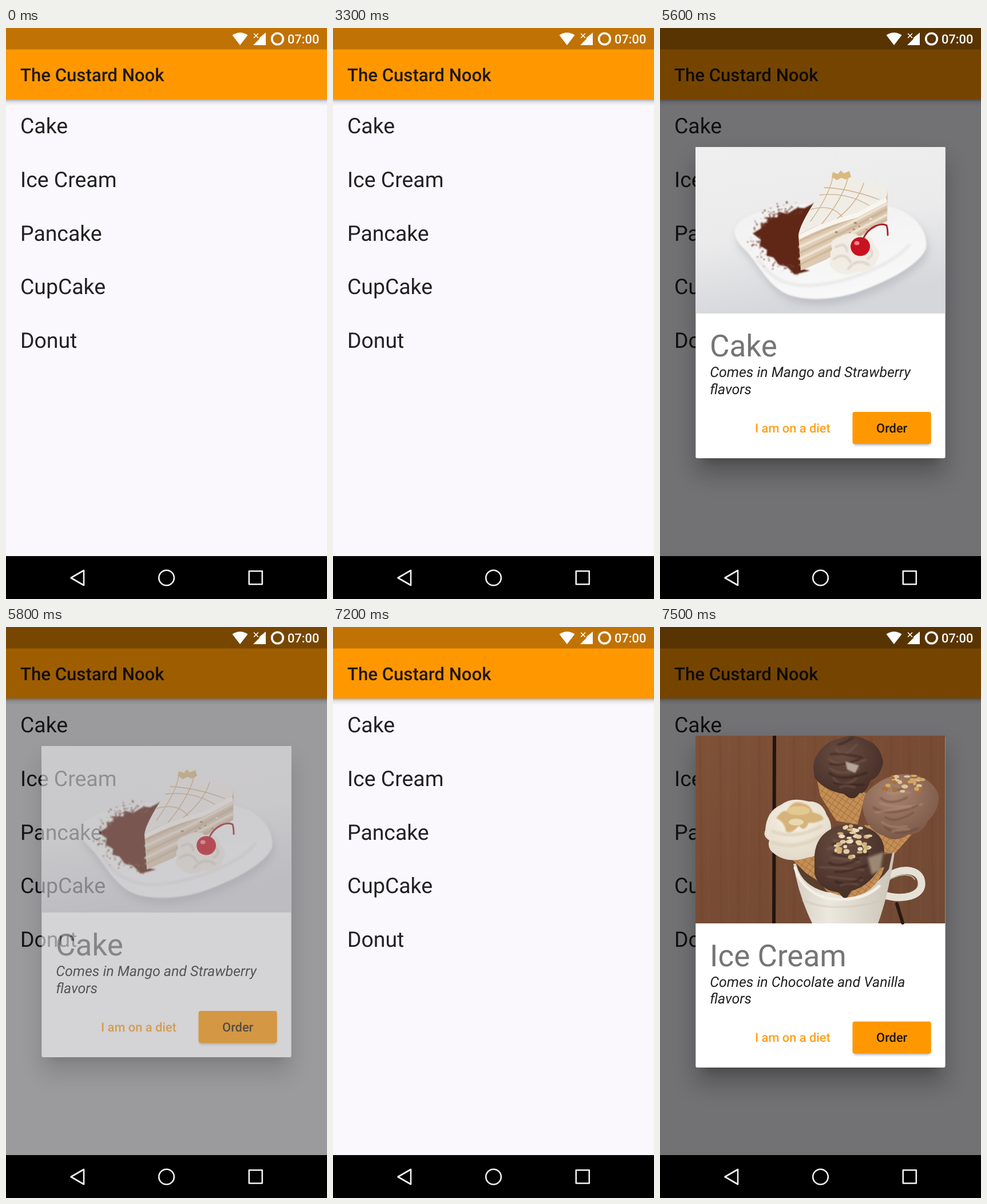
Animation, 561 px wide and 998 px high, one loop 8 s. Source, as an HTML page:

```html
<!DOCTYPE html>
<html lang="en">
<head>
<meta charset="utf-8">
<title>Dessert list</title>
<style>
html, body { margin: 0; width: 100%; height: 100%; overflow: hidden; background: #000; }
svg { display: block; width: 100vw; height: 100vh; }
text { font-family: Roboto, "Open Sans", sans-serif; text-rendering: geometricPrecision; }
.item { font-size: 37.4px; fill: #212023; }
.bar { font-size: 31.17px; font-weight: 500; fill: #201712; }
.clock { font-size: 21.8px; font-weight: 500; fill: #fff; }
.head { font-size: 53px; fill: #757575; }
.note { font-size: 24.93px; font-style: italic; fill: #212121; }
.btn { font-size: 21.8px; font-weight: 500; }
.line { fill: none; stroke-linecap: round; stroke-linejoin: round; }
</style>
</head>
<body>
<svg viewBox="0 0 561 998" preserveAspectRatio="none">
  <defs>
    <linearGradient id="drop" x2="0" y2="1">
      <stop stop-color="#000" stop-opacity=".3"/>
      <stop offset=".4" stop-color="#000" stop-opacity=".09"/>
      <stop offset="1" stop-color="#000" stop-opacity="0"/>
    </linearGradient>
    <linearGradient id="table" x2=".25" y2="1">
      <stop stop-color="#f0eff0"/><stop offset=".55" stop-color="#ebebec"/><stop offset="1" stop-color="#d6d7db"/>
    </linearGradient>
    <linearGradient id="plate" x2=".3" y2="1">
      <stop stop-color="#f1f1f1"/><stop offset="1" stop-color="#f8f8f8"/>
    </linearGradient>
    <linearGradient id="side" x2="1" y2=".4">
      <stop stop-color="#e4d0b7"/><stop offset="1" stop-color="#d6c2aa"/>
    </linearGradient>
    <linearGradient id="wood" x2="1" y2="1">
      <stop stop-color="#7e5238"/><stop offset=".45" stop-color="#784c34"/><stop offset="1" stop-color="#714a35"/>
    </linearGradient>
    <linearGradient id="cup">
      <stop stop-color="#d6cfc2"/><stop offset=".35" stop-color="#ece8de"/><stop offset="1" stop-color="#cbc3b6"/>
    </linearGradient>
    <pattern id="waffle" width="9" height="9" patternUnits="userSpaceOnUse" patternTransform="rotate(35)">
      <rect width="9" height="9" fill="#c48f55"/><path d="M0 0H9M0 0V9" stroke="#a56f3b" stroke-width="2"/>
    </pattern>
    <radialGradient id="dark" cx=".4" cy=".3" r=".75"><stop stop-color="#6a4d42"/><stop offset="1" stop-color="#412b24"/></radialGradient>
    <radialGradient id="milk" cx=".4" cy=".3" r=".75"><stop stop-color="#a98470"/><stop offset="1" stop-color="#785645"/></radialGradient>
    <radialGradient id="cream" cx=".45" cy=".35" r=".75"><stop stop-color="#f8f3e8"/><stop offset="1" stop-color="#dfd5c2"/></radialGradient>
    <filter id="soft" x="-30%" y="-30%" width="160%" height="160%"><feGaussianBlur stdDeviation="20"/></filter>
    <filter id="near" x="-30%" y="-30%" width="160%" height="160%"><feGaussianBlur stdDeviation="2"/></filter>
    <filter id="blend" x="-10%" y="-10%" width="120%" height="120%"><feGaussianBlur stdDeviation=".8"/></filter>
    <filter id="haze" x="-30%" y="-30%" width="160%" height="160%"><feGaussianBlur stdDeviation="7"/></filter>
  </defs>

  <rect width="561" height="998" fill="#faf8fc"/>
  <g id="list"></g>
  <rect y="125" width="561" height="11" fill="url(#drop)"/>
  <rect y="37" width="561" height="88" fill="#ff9800"/>
  <rect width="561" height="37.5" fill="#c07204"/>
  <text class="bar" x="25" y="93">The Custard Nook</text>

  <rect id="scrim" width="561" height="923" fill="#000" opacity="0"/>
  <g id="cake" opacity="0"></g>
  <g id="ice" opacity="0"></g>

  <g fill="#fff">
    <path d="M395.5 12.5Q409 3.5 422.5 12.5L409 30Z"/>
    <path d="M454 8V30H432L443 19V17Z"/>
    <path class="line" d="M433.5 10L440.5 17M440.5 10L433.5 17" stroke="#fff" stroke-width="1.6"/>
    <circle cx="474.5" cy="19" r="9.8" fill="none" stroke="#fff" stroke-width="3.6"/>
    <text class="clock" x="492" y="27.3">07:00</text>
  </g>
  <rect y="923" width="561" height="75"/>
  <g class="line" stroke="#f4f4f4" stroke-width="2.6">
    <path d="M113.5 961L136 948V974Z"/>
    <circle cx="280.5" cy="961" r="13.3"/>
    <rect x="424.8" y="949.3" width="23" height="23"/>
  </g>
</svg>
<script>
const $ = id => document.getElementById(id);

let seed = 7;
const rnd = () => (seed = seed * 16807 % 2147483647) / 2147483647;
const times = (n, make) => Array.from({ length: n }, (_, i) => make(i)).join('');
const shape = (d, fill, more = '') => `<path d="${d}" fill="${fill}" ${more}/>`;
const line = (d, color, width, more = '') =>
  `<path class="line" d="${d}" stroke="${color}" stroke-width="${width}" ${more}/>`;
const oval = (x, y, rx, ry, fill, more = '') =>
  `<ellipse cx="${x}" cy="${y}" rx="${rx}" ry="${ry}" fill="${fill}" ${more}/>`;
const blend = parts => `<g filter="url(#blend)">${parts}</g>`;

// Small random pieces inside an oval
const crumbs = (n, x, y, rx, ry, size, colors) => times(n, i => {
  const a = rnd() * Math.PI * 2, r = Math.sqrt(rnd());
  const px = x + Math.cos(a) * r * rx, py = y + Math.sin(a) * r * ry;
  return oval(px.toFixed(1), py.toFixed(1), (size * (.6 + rnd() * .6)).toFixed(1),
    (size * (.4 + rnd() * .4)).toFixed(1), colors[i % colors.length]);
});

// Loose powder scattered around the rim of an oval
const powder = (n, x, y, rx, ry) => times(n, () => {
  const a = Math.PI * (.42 + rnd() * 1.2), r = .78 + rnd() * rnd() * .4;
  const s = (.4 + rnd() * 1.2).toFixed(1);
  return oval((x + Math.cos(a) * r * rx).toFixed(1), (y + Math.sin(a) * r * ry).toFixed(1), s, s, '#7a4434');
});

// Soft folds across a scoop, light and dark by turns
const folds = (n, x, y, w, h, colors) => blend(times(n, i => {
  const k = (i + .5) / n * 2 - 1, half = w * Math.sqrt(1 - k * k) * (.5 + rnd() * .35);
  const left = x - half + (rnd() - .5) * w * .3;
  return line(`M${left} ${y + k * h}q${half * .6} ${rnd() * 26 - 6} ${half * 1.7} ${rnd() * 20 - 12}`,
    colors[i % colors.length], 3.5, 'opacity=".5"');
}));

function cakePhoto() {
  const plate = 'M131 352C138 324 200 310 270 306L395 311C440 318 470 352 465 385C455 412 405 440 350 460' +
    'C300 478 240 478 212 460C185 442 170 412 152 391C138 378 128 366 131 352Z';
  return `<rect x="62" y="208" width="436.5" height="291" fill="url(#table)"/>` +
    shape(plate, '#a7a8b0', 'transform="translate(3 10)" filter="url(#haze)" opacity=".5"') +
    shape(plate, 'url(#plate)', 'filter="url(#blend)"') +
    line('M172 405C195 438 218 451 262 450C330 446 405 414 436 379', '#e4e4e6', 4, 'filter="url(#near)"') +
    blend(shape('M162 359L177 350L176 342L188 340L188 331L205 331L208 321L222 325L240 314L252 315L273 304' +
      'L290 330L262 392L247 421L262 424L235 431L222 417L208 414L198 401L186 398L187 388L174 380L176 370Z', '#602817') +
      powder(170, 226, 369, 66, 58)) +
    shape('M398 285L397 336L355 362L292 404L246 424L242 362Z', 'url(#side)') +
    blend(times(5, i => line(`M244 ${372 + i * 10.5}L${320 - i} ${338 + i * 10}L396 ${298 + i * 9.5}`,
      i % 2 ? '#f2e8da' : '#c2a98b', i % 2 ? 4 : 2))) +
    crumbs(14, 338, 343, 48, 18, 2.5, ['#a58a6e', '#eee0cb', '#b8997b']) +
    shape('M242 362C246 335 278 295 297 259Q305 253 320 259L394 277Q402 288 392 299L345 322Q278 341 242 362Z', '#f0ece6') +
    shape('M242 362Q278 341 345 322L395 296L397 304L345 331Q278 350 243 370Z', '#f8f5ef') +
    line('M287 279Q330 280 383 300M279 292Q325 286 365 310M264 317Q300 307 318 330' +
      'M302 259Q298 289 263 338M328 264Q318 300 283 342M356 271Q347 303 310 333', '#cdb088', 1.3) +
    shape('M300 260L302 252L311 255L316 249L321 254L331 250L334 260L325 265L317 262L309 266Z', '#d9b980') +
    shape('M301 386Q294 370 314 365Q331 354 349 364Q373 359 374 381Q389 390 379 407Q374 427 346 426' +
      'Q322 437 305 423Q292 414 299 402Q295 394 301 386Z', '#f1ece4') +
    line('M307 383Q325 373 327 390M304 404Q322 390 333 409M329 421Q344 401 365 414M364 384Q378 394 363 403',
      '#ddd5ca', 4, 'filter="url(#blend)"') +
    oval(350, 382, 17, 16.5, '#c9121f') + oval(344, 376, 4.5, 3.5, '#f5858a') +
    line('M354 371C364 345 388 340 396 345Q398 351 398 362', '#a8202a', 2.8);
}

function icePhoto() {
  const nuts = ['#e3cda0', '#cfb07a', '#eadcbd'];
  const fudge = ['#2b1814', '#7a5d50'];
  return `<rect x="62" y="190" width="436.5" height="328" fill="url(#wood)"/>` +
    blend(times(26, i => {
      const x = 66 + i * 16.8 + rnd() * 7;
      return line(`M${x} 193q${rnd() * 8 - 4} 160 ${rnd() * 6 - 2} 322`, i % 2 ? '#8b5d42' : '#61392a', 2, 'opacity=".3"');
    })) +
    shape('M197 190H203L202 518H196Z', '#24140f') +
    line('M414 484L424 517', '#2b1912', 6) +
    shape('M272 254L280 295L308 339L345 345L360 290Z', 'url(#waffle)') +
    shape('M268 244C270 222 288 200 311 196Q336 184 360 197Q386 206 390 237Q385 262 368 268Q358 294 349 290' +
      'Q338 308 322 292Q288 287 270 263Z', 'url(#dark)') +
    folds(10, 329, 243, 54, 42, fudge) +
    shape('M324 235L348 242L341 255L327 249Z', '#b5a69a', 'filter="url(#blend)"') +
    shape('M357 346L390 394L411 395L450 352Z', 'url(#waffle)') +
    shape('M355 322Q350 292 377 275Q405 254 442 258Q474 263 487 293Q489 319 468 339Q459 362 434 363' +
      'Q410 378 391 365Q363 356 355 322Z', 'url(#milk)') +
    folds(10, 421, 320, 58, 42, ['#644538', '#b3917d']) +
    crumbs(28, 427, 275, 40, 17, 5, ['#d2a765', '#dfc698', '#a9713d']) +
    line('M397 437C425 418 455 424 457 446C460 470 425 479 390 468', '#e6e1d7', 13) +
    line('M399 443C422 428 441 433 445 441', '#b9b1a4', 2) +
    shape('M233 414Q242 469 266 518H381Q399 470 410 394Z', 'url(#cup)') +
    shape('M238 414Q247 452 290 463Q365 473 400 423L406 395Z', '#5b3d2c') +
    shape('M226 401L255 430L284 449L301 382Z', 'url(#waffle)') +
    shape('M184 355Q186 322 211 311Q230 296 260 305Q283 304 291 328Q306 350 293 368Q290 399 258 403' +
      'Q225 414 202 398Q186 388 191 373Q179 366 184 355Z', 'url(#cream)') +
    line('M196 376Q237 392 286 363M197 357Q234 373 282 348', '#d9ccb4', 4, 'filter="url(#near)"') +
    shape('M203 334Q214 318 222 322Q231 301 250 308Q264 312 267 324Q284 327 286 336Q272 344 260 342' +
      'Q252 361 243 347Q229 364 220 357Q218 341 203 334Z', '#d6b37a', 'filter="url(#blend)"') +
    oval(242, 321, 20, 8, '#e3c890') + oval(238, 341, 13, 6, '#e9d8b2') +
    shape('M272 438L292 462L326 473Q377 469 392 420Z', 'url(#waffle)') +
    shape('M270 410Q268 373 294 356Q320 338 354 349Q384 355 391 382Q395 408 380 427Q362 454 335 461' +
      'L324 477L312 464Q279 460 270 432Z', 'url(#dark)') +
    folds(12, 330, 408, 56, 48, fudge) +
    shape('M363 403L391 393L385 425L370 433Z', '#9c8873', 'filter="url(#near)"') +
    crumbs(44, 335, 375, 33, 29, 5, nuts) +
    line('M236 421Q248 461 292 474Q350 483 383 453', '#f3efe6', 5) +
    line('M250 478Q305 501 384 479', '#cfc8bb', 2, 'filter="url(#blend)"');
}

function dialog(photo, top, split, name, notes) {
  const height = 960 - top * 2, dy = split - 499;
  const shadow = (x, y, w, h, alpha, filter) =>
    `<rect x="${x}" y="${y}" width="${w}" height="${h}" opacity="${alpha}" filter="url(#${filter})"/>`;
  return shadow(62, top + 22, 436.5, height + 6, .26, 'soft') +
    shadow(76, top + 24, 408, height - 18, .14, 'haze') +
    `<rect x="62.3" y="${top}" width="436.3" height="${height}" rx="3" fill="#fff"/>` + photo +
    `<g transform="translate(0 ${dy})">
      <text class="head" x="87" y="574">${name}</text>` +
      notes.map((s, i) => `<text class="note" x="87.3" y="${610 + i * 29.5}">${s}</text>`).join('') +
      `<text class="btn" x="166" y="706.5" fill="#ff9f1a">I am on a diet</text>` +
      shadow(339, 676, 132, 53, .32, 'near') +
      `<rect x="336.5" y="671" width="137.3" height="56" rx="4" fill="#ff9800"/>
      <text class="btn" x="405.2" y="706.5" text-anchor="middle" fill="#201300">Order</text>
    </g>`;
}

$('list').innerHTML = ['Cake', 'Ice Cream', 'Pancake', 'CupCake', 'Donut']
  .map((s, i) => `<text class="item" x="25" y="${184.3 + i * 93.6}">${s}</text>`).join('');
$('cake').innerHTML = dialog(cakePhoto(), 208, 499, 'Cake', ['Comes in Mango and Strawberry', 'flavors']);
$('ice').innerHTML = dialog(icePhoto(), 190, 517.5, 'Ice Cream', ['Comes in Chocolate and Vanilla', 'flavors']);

// [time in ms, opacity], each value held until the next
const LOOP = 8000;
const steps = {
  scrim: [[0, 0], [3400, .475], [3500, .54], [5800, .38], [5900, 0], [7300, .475], [7400, .54]],
  cake: [[0, 0], [3400, .78], [3500, 1], [5800, .57], [5900, 0]],
  ice: [[0, 0], [7300, .78], [7400, 1]]
};
for (const [id, rows] of Object.entries(steps)) {
  const frames = rows.map(([t, opacity]) => ({ offset: t / LOOP, opacity, easing: 'steps(1, end)' }));
  frames.push({ offset: 1, opacity: rows[rows.length - 1][1] });
  $(id).animate(frames, { duration: LOOP, iterations: Infinity });
}
</script>
</body>
</html>
```
